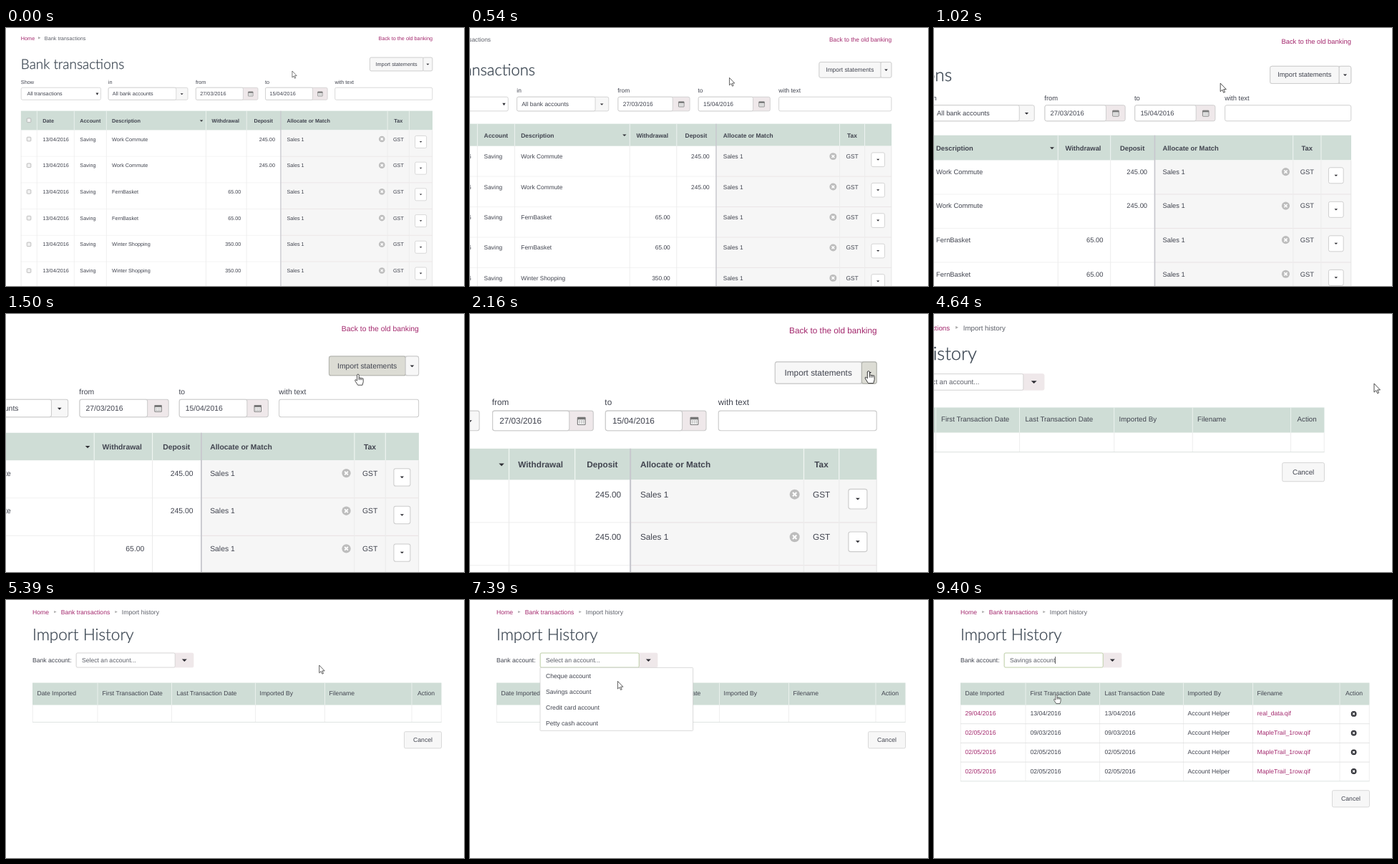
Animation of 640 by 360 pixels, one loop 9760 ms. Source, as an HTML page:

```html
<!DOCTYPE html>
<html lang="en">
<head>
<meta charset="utf-8">
<title>Import history walkthrough</title>
<style>
  html, body { margin: 0; width: 100%; height: 100%; overflow: hidden; background: #fff; }
  svg { display: block; width: 100%; height: 100%; }
  text { font: 7.25px "Liberation Sans", Arial, sans-serif; fill: #41444f; text-rendering: geometricPrecision; }
  #history text { font-size: 8.65px; }
  text.bold { font-weight: 700; }
  text.link, #history text.link { fill: #a3286d; }
  text.soft { fill: #5c5f68; }
  text.end { text-anchor: end; }
  text.mid { text-anchor: middle; }
  text.title, #history text.title { font: 300 18.95px Lato, "Open Sans", sans-serif; fill: #36414d; stroke: #36414d; stroke-width: .25; }
  #history text.title { font-size: 22.55px; }
  .hover { fill: #dcdcd4; stroke: #b2b3ad; }
</style>
</head>
<body>
<svg viewBox="0 0 640 360">
  <g id="view">
    <g id="bank"></g>
    <g transform="scale(.84034) translate(-12 0)"><g id="history"></g></g>
    <g id="cursor" fill="#fff" stroke="#333" stroke-width=".65" stroke-linejoin="round">
      <path id="arrow" d="M0 0V9L2.1 7.1L3.5 10.2L4.9 9.6L3.5 6.6H6.3Z"/>
      <path id="hand" transform="scale(.93)" d="M-1 1a1 1 0 0 1 2 0V4.2a.75 .75 0 0 1 1.5 .2a.75 .75 0 0 1 1.5 .3a.75 .75 0 0 1 1.5 .4V8L4.6 11.3H-.2L-3 6.9q-.4-1.5 .9-1.2L-1 6.8ZM1 4.2V6M2.5 4.5V6M4 4.8V6"/>
    </g>
  </g>
</svg>
<script>
const LOOP = 9760;
const HEADER = '#cfddd6', LINE = '#e6e6e6', BORDER = '#cbcbcb', PANEL = '#f7f7f7', PINK = '#efe8ea';
const $ = id => document.getElementById(id);

const text = (x, y, s, cls = '') => `<text x="${x}" y="${y}" class="${cls}">${s}</text>`;
const box = (x, y, w, h, fill = '#fff', stroke = BORDER, r = 1.8, id = '') =>
  `<rect ${id && `id="${id}"`} x="${x}" y="${y}" width="${w}" height="${h}" rx="${r}" fill="${fill}" stroke="${stroke}" stroke-width=".7"/>`;
const fill = (x, y, w, h, color) => `<rect x="${x}" y="${y}" width="${w}" height="${h}" fill="${color}"/>`;
const line = (x1, y1, x2, y2, color = LINE, w = .8) =>
  `<path d="M${x1} ${y1}L${x2} ${y2}" stroke="${color}" stroke-width="${w}"/>`;
const caret = (x, y, w = 4) => `<path d="M${x - w / 2} ${y - w / 4}h${w}l${-w / 2} ${w / 2}z" fill="#2d2d33"/>`;
const crumb = (x, y) => `<path d="M${x} ${y - 1.7}l3.4 1.7l-3.4 1.7z" fill="#aaa"/>`;
const cross = (x, y, r, color) => {
  const d = r * .38;
  return `<circle cx="${x}" cy="${y}" r="${r}" fill="${color}"/>` +
    line(x - d, y - d, x + d, y + d, '#fff', r * .3) + line(x - d, y + d, x + d, y - d, '#fff', r * .3);
};
const check = y => box(29.4, y, 5.6, 5.6, '#f1f1f1', '#a5a5a5', 1);
const calendar = (x, y) => box(x - 3.3, y - 3, 6.6, 6.2, '#fff', '#777', .4) +
  fill(x - 3.3, y - 3, 6.6, 1.8, '#777') +
  `<path d="M${x - 2.2} ${y}h4.6M${x - 2.2} ${y + 1.6}h4.6" stroke="#888" stroke-width=".8" stroke-dasharray="1 .7"/>`;
const dateField = (x, date) => box(x, 83.2, 86.6, 17, PINK) + box(x, 83.2, 66, 17) +
  text(x + 5.9, 94.3, date) + calendar(x + 76.4, 91.9);

function bankPage() {
  const top = 115.6, head = 142.4, step = 36.7;
  const rows = [
    ['Work Commute', '245.00', 376], ['Work Commute', '245.00', 376],
    ['FernBasket', '65.00', 328.5], ['FernBasket', '65.00', 328.5],
    ['Winter Shopping', '350.00', 328.5], ['Winter Shopping', '350.00', 328.5]
  ];
  let s = text(21, 16.7, 'Home', 'link') + crumb(45.2, 13.8) + text(54, 16.7, 'Bank transactions', 'soft') +
    text(596, 16.7, 'Back to the old banking', 'link end') + text(21, 57.3, 'Bank transactions', 'title');

  s += box(508.5, 41.2, 87.3, 18.6, PANEL) + box(508.5, 41.2, 74.5, 18.6, PANEL, BORDER, 1.8, 'importButton') +
    box(583, 41.2, 12.8, 18.6, PANEL, BORDER, 1.8, 'moreButton') +
    text(516.6, 52.8, 'Import statements') + caret(589.4, 50.8);

  [['Show', 21], ['in', 143], ['from', 265], ['to', 362], ['with text', 459.5]]
    .forEach(([label, x]) => s += text(x, 78.2, label));
  s += box(21.4, 83.2, 111.2, 17) + text(29.6, 94.3, 'All transactions') +
    '<path d="M125.7 90.5h3.8l-1.9 3.2z" fill="#2d2d33"/>' +
    box(143.3, 83.2, 110.8, 17, PANEL) + box(143.3, 83.2, 94.6, 17) +
    text(149, 94.3, 'All bank accounts') + caret(245.8, 92.2) +
    dateField(265.5, '27/03/2016') + dateField(362.6, '15/04/2016') + box(459.8, 83.2, 136, 17);

  s += fill(21, top, 575, head - top, HEADER) + fill(384, head, 212, 300, '#f6f6f6') + check(126);
  [['Date', 51.5], ['Account', 103.5], ['Description', 148.2], ['Withdrawal', 287.5],
   ['Deposit', 346.5], ['Allocate or Match', 392.5], ['Tax', 542.3]]
    .forEach(([label, x]) => s += text(x, 131.9, label, 'bold'));
  s += caret(273.2, 129.5, 4.6);
  rows.forEach(([what, amount, right], i) => {
    const y = head + i * step, base = y + 15.1;
    s += line(21, y + step, 384, y + step, '#f1f1f1') + line(384, y + step, 596, y + step, '#eae4e5') +
      check(y + 9.8) + text(51.7, base, '13/04/2016') + text(103.5, base, 'Saving') + text(148.2, base, what) +
      text(right, base, amount, 'end') + text(392.5, base, 'Sales 1') + cross(525.3, y + 12.5, 4.3, '#bdbdbd') +
      text(548.4, base, 'GST', 'mid') + box(571.6, y + 8, 16, 17) + caret(579.6, y + 16.5, 3.6);
  });
  [43.5, 95.5, 140.5, 279.6, 336.3, 533.2, 563.5].forEach(x =>
    s += line(x, top, x, head, '#f0f5f2') + line(x, head, x, 370, '#ececec'));
  s += line(21.3, head, 21.3, 370) + line(595.8, head, 595.8, 370) + line(384, top, 384, 370, '#c8c8ce', 1.3);

  s += `<g id="menu">${box(509, 61.4, 85, 20.6)}${text(516.5, 74.4, 'Import history')}</g>`;
  return s;
}

function historyPage() {
  const top = 115.5, head = 146.5, step = 26.7;
  const columns = [43.5, 134.5, 238.5, 354.5, 451.5];
  const bounds = [128, 231.5, 348.5, 445.5, 567];
  const rows = [
    ['29/04/2016', '13/04/2016', 'real_data.qif'], ['02/05/2016', '09/03/2016', 'MapleTrail_1row.qif'],
    ['02/05/2016', '02/05/2016', 'MapleTrail_1row.qif'], ['02/05/2016', '02/05/2016', 'MapleTrail_1row.qif']
  ];
  const body = bottom => [37.3, ...bounds, 608.3].map(x => line(x, head, x, bottom, '#ebebeb')).join('') +
    line(37, bottom, 608.6, bottom, '#d9dfdc');

  let s = text(37, 20, 'Home', 'link') + crumb(67.2, 16.6) + text(76.7, 20, 'Bank transactions', 'link') +
    crumb(152.4, 16.6) + text(161.8, 20, 'Import history', 'soft') + text(37, 56.4, 'Import History', 'title') +
    text(37, 87, 'Bank account:') + box(98, 74, 164, 20, PINK, PINK) + box(98.2, 74, 138, 20, '#fff', BORDER, 1.8, 'field') +
    caret(249.3, 84.2, 7) + `<g id="placeholder">${text(106, 87, 'Select an account...', 'soft')}</g>` +
    `<g id="chosen">${text(106, 87, 'Savings account', 'soft')}</g>` +
    '<rect id="blink" y="79" width=".8" height="10" fill="#444"/>';

  s += fill(37, top, 571.5, head - top, HEADER);
  ['Date Imported', 'First Transaction Date', 'Last Transaction Date', 'Imported By', 'Filename', 'Action']
    .forEach((label, i) => s += text(columns[i] ?? 575, 132.7, label));
  bounds.forEach(x => s += line(x, top, x, head, '#f0f5f2'));

  s += `<g id="empty">${body(170.5)}</g><g id="filled">${body(head + 4 * step - .5)}`;
  rows.forEach(([imported, date, file], i) => {
    const y = head + i * step, base = y + 14.9;
    if (i) s += line(37, y - .5, 608.6, y - .5, '#dcdedd');
    [imported, date, date, 'Account Helper', file].forEach((cell, c) =>
      s += text(columns[c], base, cell, c % 4 ? '' : 'link'));
    s += cross(586.6, y + 12.4, 3.9, '#33343a');
  });
  s += `</g><g id="cancel">${box(556.5, 183.7, 52, 23.2, PANEL)}${text(582.5, 198.3, 'Cancel', 'mid')}</g>`;

  s += `<g id="list">${box(98, 94.4, 213.6, 88, '#fff', BORDER, 1)}`;
  ['Cheque account', 'Savings account', 'Credit card account', 'Petty cash account']
    .forEach((label, i) => s += `<g id="option${i}">${text(106, 108.5 + i * 22, label)}</g>`);
  return s + '</g>';
}

// Keys are [time, ...values]; values run linearly between keys.
const viewKeys = [[0, 1, 0], [2370, 1.685, -438.4], [3650, 1.685, -438.4], [5090, 1.19, 12]];
const cursorKeys = [
  [700, 400, 60], [1500, 536.6, 58.7], [2010, 588.8, 49], [2770, 588.8, 49], [3280, 553, 72.2], [4790, 553, 72.2],
  [5390, 358, 76.5], [6050, 200, 75.8], [7060, 200, 75.8], [7660, 133.6, 111]
];
function at(keys, t) {
  if (t <= keys[0][0]) return keys[0].slice(1);
  const i = keys.findIndex(k => k[0] > t);
  if (i < 0) return keys[keys.length - 1].slice(1);
  const a = keys[i - 1], b = keys[i], p = (t - a[0]) / (b[0] - a[0]);
  return a.slice(1).map((v, n) => v + (b[n + 1] - v) * p);
}
const show = (id, on) => $(id).style.display = on ? '' : 'none';
const within = (t, from, to) => t >= from && t < to;

function draw(t) {
  const [scale, shift] = at(viewKeys, t), [x, y] = at(cursorKeys, t);
  $('view').setAttribute('transform', `translate(${shift} 0) scale(${scale})`);
  $('cursor').setAttribute('transform', `translate(${x} ${y})`);

  const onBank = t < 4050;
  show('bank', onBank);
  show('history', !onBank);
  const overButton = onBank && x >= 508.5 && y < 60;
  $('importButton').classList.toggle('hover', overButton && x < 583);
  $('moreButton').classList.toggle('hover', overButton && x >= 583);
  show('menu', within(t, 2770, 3680));
  const pointing = onBank ? x >= 508.5 : t >= 7820;
  show('hand', pointing);
  show('arrow', !pointing);

  const picked = t >= 8350, loaded = t >= 8470;
  show('placeholder', !picked);
  show('chosen', picked);
  show('empty', !loaded);
  show('filled', loaded);
  $('cancel').setAttribute('transform', `translate(0 ${loaded ? 82 : 0})`);
  $('field').setAttribute('stroke', t >= 6650 ? '#a6c288' : BORDER);
  show('list', within(t, 6650, 8350));
  $('list').setAttribute('opacity', Math.min(1, (t - 6620) / 180));
  $('option1').firstChild.classList.toggle('link', t >= 7500);
  show('blink', within(t, 6650, 7060) || within(t, 7590, 8120) || within(t, 8350, 8870) || t >= 9400);
  $('blink').setAttribute('x', picked ? 169 : 105.4);
}

$('bank').innerHTML = bankPage();
$('history').innerHTML = historyPage();
const start = performance.now();
(function frame() {
  draw((performance.now() - start) % LOOP);
  requestAnimationFrame(frame);
})();
</script>
</body>
</html>
```
